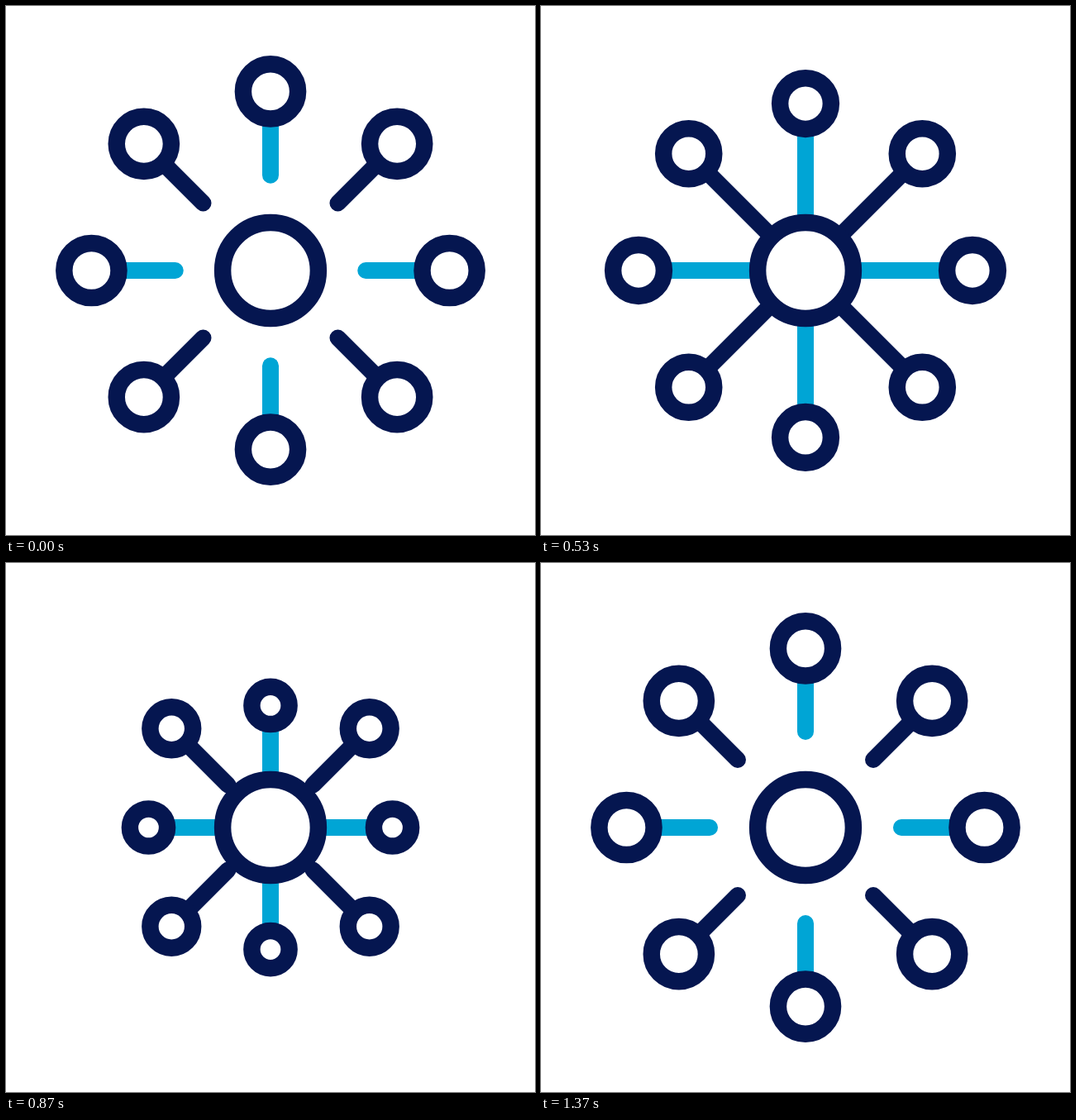
Recreate the animation shown at these times as an HTML page with a canvas. Size 640 by 640 pixels, loop 1670 ms.

```html
<!DOCTYPE html>
<html lang="en">
<head>
<meta charset="utf-8">
<title>Hub and nodes</title>
<style>
  html, body { margin: 0; height: 100%; overflow: hidden; background: #fff; }
  canvas { display: block; width: 100vw; height: 100vh; }
</style>
</head>
<body>
<canvas id="stage" width="640" height="640"></canvas>
<script>
const ctx = document.getElementById('stage').getContext('2d');
const LOOP = 1670, STEP = 100 / 3;
const NAVY = '#051650', CYAN = '#00a5d5';

// Times are in steps: nodes move in from 13 to `inEnd`, and out from `outStart` to `outEnd`.
const straight = { color: CYAN, travel: 74, inEnd: 25, outStart: 24.8, outEnd: 41.2, outEase: [0.07, 0.73] };
const diagonal = { color: NAVY, travel: 57, inEnd: 22, outStart: 22.5, outEnd: 36.6, outEase: [0.3, 0.667] };

// Cubic Bezier easing (a, 0, b, 1), solved by bisection.
function ease(x, a, b) {
  if (x <= 0) return 0;
  if (x >= 1) return 1;
  let low = 0, high = 1, s;
  for (let i = 0; i < 24; i++) {
    s = (low + high) / 2;
    const bx = 3 * a * s * (1 - s) ** 2 + 3 * b * s * s * (1 - s) + s ** 3;
    if (bx < x) low = s; else high = s;
  }
  return s * s * (3 - 2 * s);
}

const progress = (t, from, to) => (t - from) / (to - from);

function ring(x, radius) {
  ctx.beginPath();
  ctx.arc(x, 0, radius, 0, Math.PI * 2);
  ctx.fillStyle = '#fff';
  ctx.fill();
  ctx.strokeStyle = NAVY;
  ctx.lineWidth = 20.5;
  ctx.stroke();
}

function pose(t, arm) {
  const out = ease(progress(t, arm.outStart, arm.outEnd), ...arm.outEase);
  const pull = Math.min(ease(progress(t, 13, arm.inEnd), 0.2, 0.8), 1 - out);
  const reach = Math.min(ease(progress(t, -1, 13), 0.333, 0.667), 1 - out);
  const shift = arm.travel * pull;
  return { node: 216.6 - shift, radius: 33.1 - 0.152 * shift, tip: 116 - 52 * reach };
}

function draw(t) {
  ctx.setTransform(1, 0, 0, 1, 0, 0);
  ctx.fillStyle = '#fff';
  ctx.fillRect(0, 0, 640, 640);
  ctx.translate(320, 320);
  ctx.lineCap = 'round';
  for (let i = 0; i < 8; i++) {
    const arm = i % 2 ? diagonal : straight;
    const { node, radius, tip } = pose(t, arm);
    ctx.beginPath();
    ctx.moveTo(tip, 0);
    ctx.lineTo(node, 0);
    ctx.strokeStyle = arm.color;
    ctx.lineWidth = 20;
    ctx.stroke();
    ring(node, radius);
    ctx.rotate(Math.PI / 4);
  }
  ring(0, 57.9);
}

const start = performance.now();
function tick() {
  const ms = (performance.now() - start) % LOOP;
  draw(Math.floor((ms + 4) / STEP));
  requestAnimationFrame(tick);
}
tick();
</script>
</body>
</html>
```
